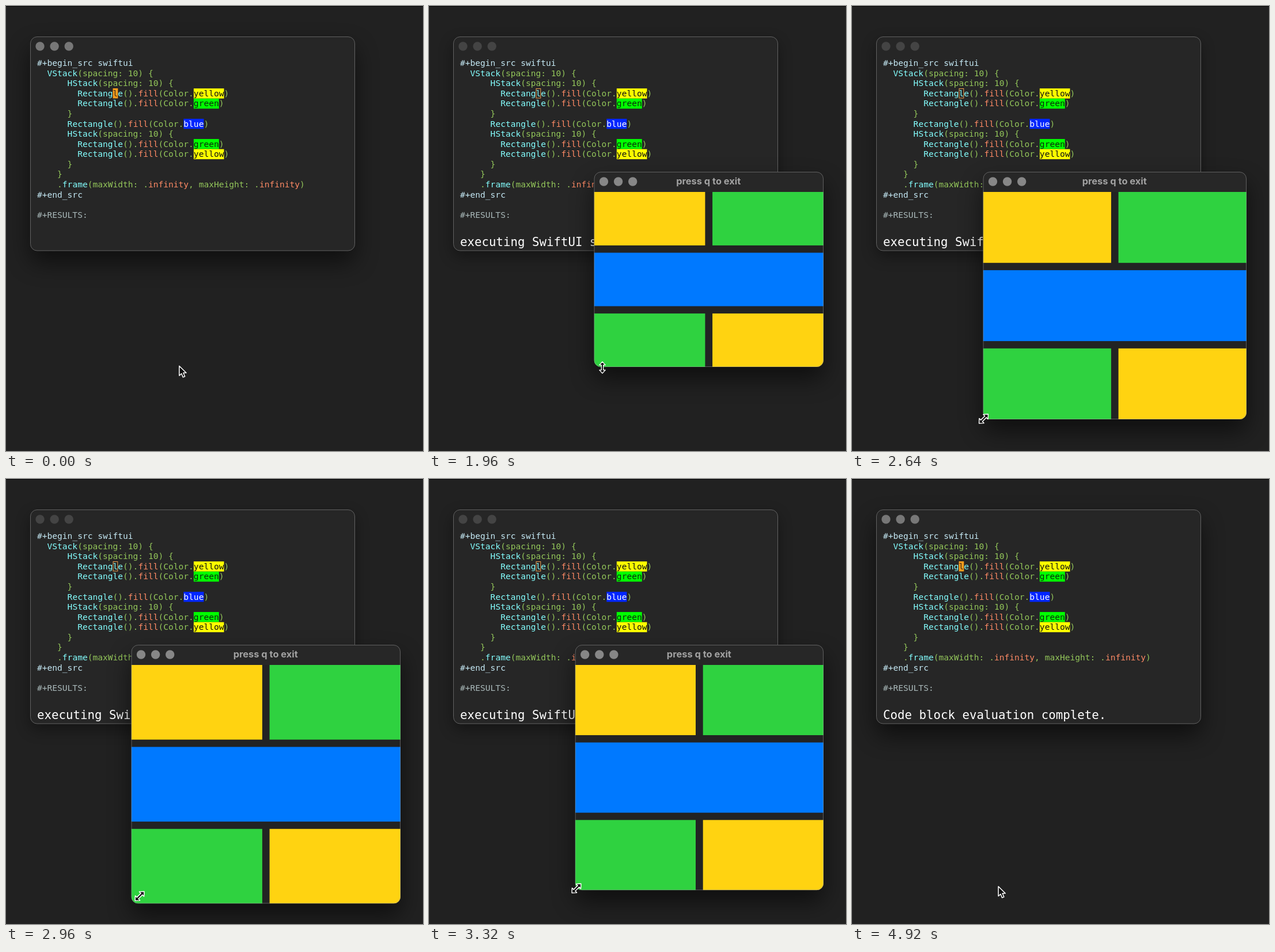
These frames come from a looping animation (724x773 px, 5 s). An HTML page:

```html
<!DOCTYPE html>
<html lang="en">
<head>
<meta charset="utf-8">
<title>Code block preview</title>
<style>
  html, body { margin: 0; width: 100%; height: 100%; overflow: hidden; background: #212121; }
  svg { display: block; width: 724px; height: 773px; }
  text { white-space: pre; }
  .code { font: 14.57px "DejaVu Sans Mono", monospace; }
  .echo { font: 20.75px "DejaVu Sans Mono", monospace; fill: #fff; }
  .title { font: 700 16.4px Inter, sans-serif; text-anchor: middle; }
</style>
</head>
<body>
<svg id="stage" viewBox="0 0 724 773" xmlns="http://www.w3.org/2000/svg">
  <defs>
    <filter id="soft" filterUnits="userSpaceOnUse" x="-80" y="-80" width="900" height="950">
      <feGaussianBlur stdDeviation="20"/>
    </filter>
    <filter id="tight" filterUnits="userSpaceOnUse" x="-80" y="-80" width="900" height="950">
      <feGaussianBlur stdDeviation="13"/>
    </filter>
    <clipPath id="frame"><rect id="frameBox" rx="12"/></clipPath>
  </defs>
  <rect width="724" height="773" fill="#212121"/>
  <rect width="724" height="1" fill="#050505"/>
  <g id="editor">
    <rect id="editorShade" x="42" width="563" height="372" rx="12"/>
    <rect x="42.5" y="53.5" width="563" height="371.5" rx="11.5" fill="#262626" stroke="#626262"/>
    <g id="editorLights"></g>
    <g id="code" class="code"></g>
    <g id="caret" class="code"></g>
    <text id="echo" class="echo" x="54" y="417"></text>
  </g>
  <g id="preview">
    <rect id="previewShade" rx="12"/>
    <g clip-path="url(#frame)">
      <rect id="body" fill="#222323"/>
      <rect id="bar" y="288" height="35" fill="#272727"/>
      <g id="tiles"></g>
    </g>
    <rect id="edge" fill="none" stroke="#a0a0a0" stroke-opacity=".48" rx="11.5"/>
    <g id="previewLights"></g>
    <text id="title" class="title" y="310">press q to exit</text>
  </g>
  <g id="pointer" stroke="#fff" stroke-linejoin="round" fill="#111">
    <path id="arrow" stroke-width="1.5" d="M0.8 0.8V17.6L4.7 14L7.3 20.4L10.6 19L7.9 12.8H13Z"/>
    <path id="resize" stroke-width="1.3" d="M0 -10L5.2 -4.4H1.7V4.4H5.2L0 10L-5.2 4.4H-1.7V-4.4H-5.2Z"/>
  </g>
</svg>
<script>
const LOOP = 5000, STEP = 40;
const RIGHT = 685, TOP = 288, BAR = 35, GAP = 12.7;
const COL = 8.77, ROW = 17.57, LEFT = 54;
const YELLOW = '#ffd311', GREEN = '#2fd240', BLUE = '#0079ff';

const $ = id => document.getElementById(id);

function add(parent, tag, attrs, text) {
  const el = document.createElementNS('http://www.w3.org/2000/svg', tag);
  set(el, attrs);
  if (text) el.textContent = text;
  return parent.appendChild(el);
}

function set(el, attrs) {
  for (const k in attrs) el.setAttribute(k, attrs[k]);
}

function show(el, on) {
  el.setAttribute('visibility', on ? 'visible' : 'hidden');
}

// Source listing with syntax colours
const listing = `#+begin_src swiftui
  VStack(spacing: 10) {
      HStack(spacing: 10) {
        Rectangle().fill(Color.yellow)
        Rectangle().fill(Color.green)
      }
      Rectangle().fill(Color.blue)
      HStack(spacing: 10) {
        Rectangle().fill(Color.green)
        Rectangle().fill(Color.yellow)
      }
    }
    .frame(maxWidth: .infinity, maxHeight: .infinity)
#+end_src

#+RESULTS:`.split('\n');

const swatch = {
  yellow: ['#ffff00', '#111'],
  green: ['#00ff00', '#0a2a0a'],
  blue: ['#0026ff', '#fff']
};

function ink(word) {
  if (/^#\+R/.test(word)) return '#a9b8b9';
  if (/^#/.test(word)) return '#c5e9f5';
  if (/Stack|Rectangle|frame/.test(word)) return '#84ffff';
  if (/fill|infinity/.test(word)) return '#ff8a65';
  return '#93c65a';
}

listing.forEach((line, row) => {
  const words = line.matchAll(/#.+|VStack|HStack|Rectangle|frame|fill|infinity|yellow|green|blue|(?:(?!VStack|HStack|Rectangle|frame|fill|infinity|yellow|green|blue).)+/g);
  for (const m of words) {
    const word = m[0], pad = word.length - word.trimStart().length;
    if (pad === word.length) continue;
    const x = LEFT + (m.index + pad) * COL;
    const [back, fore] = swatch[word] || [null, ink(word)];
    if (back) add($('code'), 'rect', { x, y: 90.5 + row * ROW, width: word.length * COL, height: 17.5, fill: back });
    add($('code'), 'text', { x, y: 104.2 + row * ROW, fill: fore }, word.trim());
  }
});

const caretX = LEFT + 15 * COL;
const block = add($('caret'), 'g', {});
add(block, 'rect', { x: caretX, y: 143, width: COL, height: 17.5, fill: '#f79c1c' });
add(block, 'text', { x: caretX, y: 104.2 + 3 * ROW, fill: '#3a2a18' }, 'l');
const hollow = add($('caret'), 'rect', { x: caretX + .5, y: 143.5, width: COL - 1, height: 16.5, fill: 'none', stroke: '#f0a050' });

const lights = (parent, x, y) =>
  [0, 1, 2].forEach(i => add(parent, 'circle', { cx: x + i * 25.1, cy: y, r: 7.7 }));
lights($('editorLights'), 59, 70);
lights($('previewLights'), 17, 305);

const tiles = [YELLOW, GREEN, BLUE, GREEN, YELLOW].map(fill => add($('tiles'), 'rect', { fill }));

// Keys: time, x, y
const corner = [
  [2040, 286.5, 627], [2120, 273, 647], [2240, 247, 688], [2360, 233.5, 708.5],
  [2480, 232.5, 710], [2640, 227.5, 718], [2800, 221, 731], [2900, 217, 738],
  [2960, 217.5, 737.5], [3080, 237, 725], [3200, 249, 717], [3320, 253.7, 714.3]
];
const mouse = [
  [1960, 301, 628], [2040, 287, 628], [2120, 272, 649], [2240, 245, 690], [2360, 233, 709],
  [2480, 232, 710], [2640, 228.5, 717], [2800, 220, 732], [2880, 218, 737],
  [2960, 232, 724.5], [3080, 245, 717], [3320, 256, 711]
];

function along(keys, t) {
  if (t <= keys[0][0]) return keys[0].slice(1);
  const i = keys.findIndex(k => k[0] >= t);
  if (i < 0) return keys[keys.length - 1].slice(1);
  const [t0, x0, y0] = keys[i - 1], [t1, x1, y1] = keys[i];
  const p = (t - t0) / (t1 - t0);
  return [x0 + (x1 - x0) * p, y0 + (y1 - y0) * p];
}

const within = (t, a, b) => t >= a && t < b;

function echoText(t) {
  if (t < 680) return '';
  if (t < 800) return 'C-c-';
  if (t < 1320) return 'C-c C-c';
  if (t < 4400) return 'executing SwiftUI source code block';
  return 'Code block evaluation complete.';
}

function shade(el, active) {
  set(el, { filter: active ? 'url(#soft)' : 'url(#tight)', opacity: active ? .55 : .38 });
}

function drawEditor(t) {
  const active = !within(t, 1680, 4400);
  shade($('editorShade'), active);
  $('editorShade').setAttribute('y', active ? 73 : 63);
  $('editorLights').setAttribute('fill', active ? '#777' : '#444');
  const off = within(t, 160, 520) || within(t, 680, 800) || within(t, 4560, 4920);
  show(block, active && !off);
  show(hollow, !active);
  $('echo').textContent = echoText(t);
}

function drawPreview(t) {
  const open = within(t, 1480, 4400);
  $('preview').style.display = open ? '' : 'none';
  if (!open) return;
  const [x, bottom] = along(corner, t);
  const width = RIGHT - x, height = bottom - TOP, active = t >= 1680;
  $('preview').setAttribute('opacity', t < 1520 || t >= 4360 ? .55 : 1);
  shade($('previewShade'), active);
  set($('previewShade'), { x, y: TOP + (active ? 20 : 10), width, height });
  for (const id of ['frameBox', 'body']) set($(id), { x, y: TOP, width, height });
  set($('bar'), { x, width });
  set($('edge'), { x: x + .5, y: TOP + .5, width: width - 1, height: height - 1 });
  set($('previewLights'), { transform: `translate(${x} 0)`, fill: active ? '#878787' : '#484848' });
  set($('title'), { x: (x + RIGHT) / 2 - .5, fill: active ? '#a2a2a2' : '#686868' });

  const half = (width - GAP) / 2, rowH = (height - BAR - 2 * GAP) / 3;
  tiles.forEach((tile, i) => {
    const row = [0, 0, 1, 2, 2][i], second = i === 1 || i === 4;
    set(tile, {
      x: second ? x + half + GAP : x,
      y: TOP + BAR + row * (rowH + GAP),
      width: i === 2 ? width : half,
      height: rowH
    });
  });
}

function drawPointer(t) {
  const dragging = within(t, 1960, 4360);
  show($('arrow'), t < 720 || t >= 4360);
  show($('resize'), dragging);
  if (dragging) {
    const [x, y] = along(mouse, t);
    const turn = t < 2040 ? '' : 'rotate(45) scale(1.12)';
    $('resize').setAttribute('transform', `translate(${x} ${y}) ${turn}`);
  } else {
    $('arrow').setAttribute('transform', t < 720 ? 'translate(300 624.5)' : 'translate(253.3 707)');
  }
}

function render(ms) {
  const t = Math.floor((ms % LOOP) / STEP) * STEP;
  drawEditor(t);
  drawPreview(t);
  drawPointer(t);
}

const start = performance.now();
function tick() {
  render(performance.now() - start);
  requestAnimationFrame(tick);
}
tick();
</script>
</body>
</html>
```
